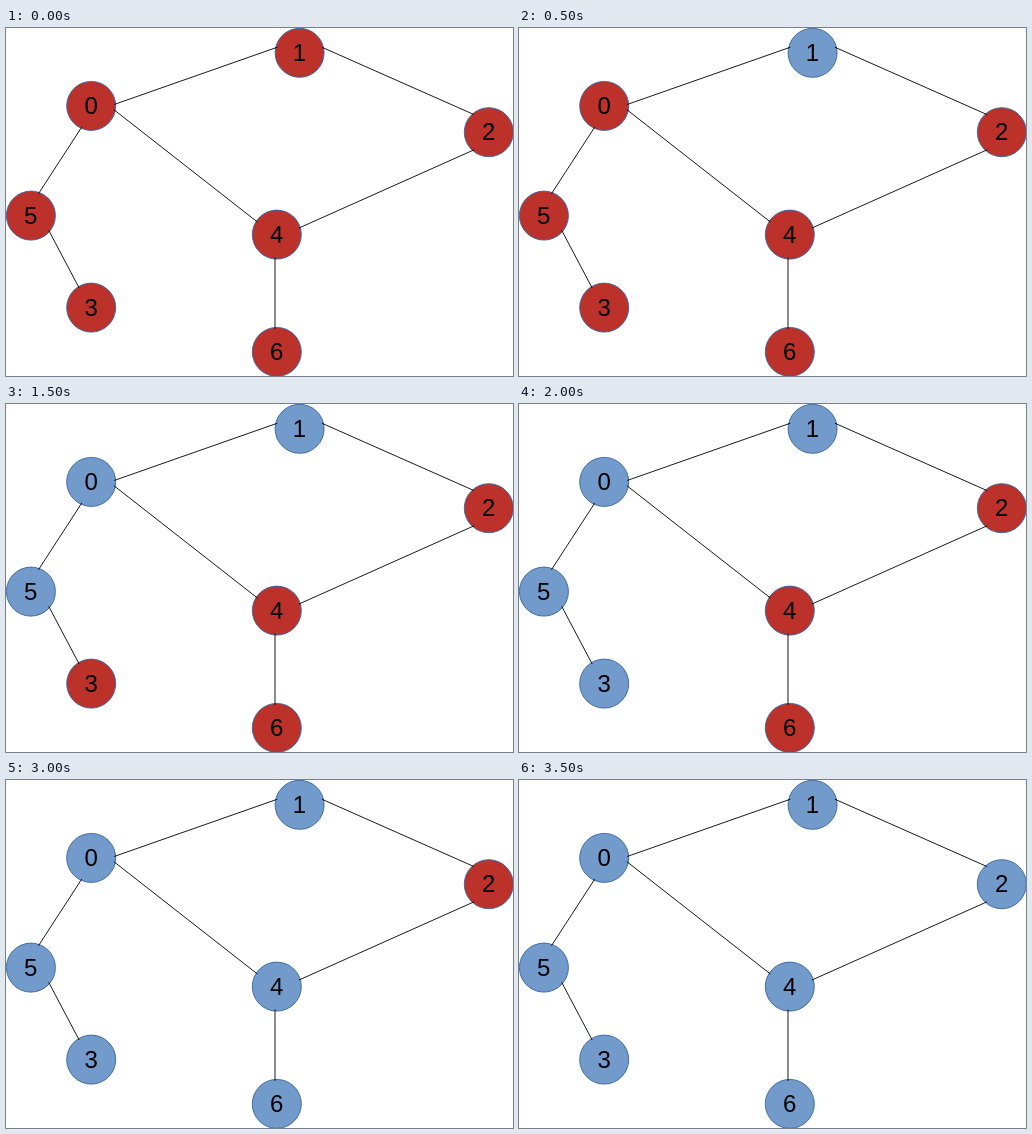
These frames come from a looping animation (507 px wide and 348 px high, 4000 ms). An HTML page:

```html
<!DOCTYPE html>
<html lang="en">
<head>
<meta charset="utf-8">
<title>Depth-first traversal</title>
<style>
  html, body { margin: 0; width: 100%; height: 100%; overflow: hidden; background: #fff; }
  svg { display: block; width: 507px; height: 348px; }
  circle { stroke: #3465a4; stroke-width: 0.9; }
  line { stroke: #000; stroke-width: 0.9; }
  text { font: 24px "Liberation Sans", Arial, sans-serif; text-anchor: middle; fill: #000; }
</style>
</head>
<body>
<svg id="stage" viewBox="0 0 507 348"></svg>
<script>
const RED = "#bd312b", BLUE = "#729bcc";
const STEP = 500, LOOP = 4000;
const RADIUS = 24.5, PORT = 23; // lines end just inside the rim

const node = (x, y) => ({ x, y, links: [] });
const nodes = [
  node(85.2, 77.9), node(293.6, 24.8), node(482.8, 104.2), node(85.2, 279.6),
  node(270.8, 206.6), node(24.9, 187.6), node(270.8, 323.9)
];
const stage = document.getElementById("stage");

function add(tag, attrs) {
  const el = document.createElementNS("http://www.w3.org/2000/svg", tag);
  for (const key in attrs) el.setAttribute(key, attrs[key]);
  return stage.appendChild(el);
}

// Point on a node's rim; degrees run clockwise from the right
function port({ x, y }, deg) {
  const a = deg * Math.PI / 180;
  return [x + PORT * Math.cos(a), y + PORT * Math.sin(a)];
}

function connect(a, degA, b, degB) {
  const [x1, y1] = port(nodes[a], degA);
  const [x2, y2] = port(nodes[b], degB);
  add("line", { x1, y1, x2, y2 });
  nodes[a].links.push(b);
  nodes[b].links.push(a);
}

// Depth-first search gives the order in which nodes turn blue
function visit(label, seen = []) {
  seen.push(label);
  for (const next of nodes[label].links) {
    if (!seen.includes(next)) visit(next, seen);
  }
  return seen;
}

const discs = nodes.map(({ x, y }) => add("circle", { cx: x, cy: y, r: RADIUS }));

connect(0, -3.5, 1, 194);
connect(0, 114, 5, -71);
connect(5, 39.5, 3, 238.5);
connect(0, 9.5, 4, 213);
connect(4, 94.5, 6, -94.5);
connect(4, -16.5, 2, 130);
connect(1, -14, 2, 230);

nodes.forEach(({ x, y }, label) => {
  add("text", { x: x - 0.1, y: y + 8 }).textContent = label;
});

const order = visit(1);

function draw(ms) {
  const visited = Math.floor((ms % LOOP) / STEP);
  order.forEach((label, i) => {
    discs[label].setAttribute("fill", i < visited ? BLUE : RED);
  });
}

const start = performance.now();
function tick() {
  draw(performance.now() - start);
  requestAnimationFrame(tick);
}
tick();
</script>
</body>
</html>
```
